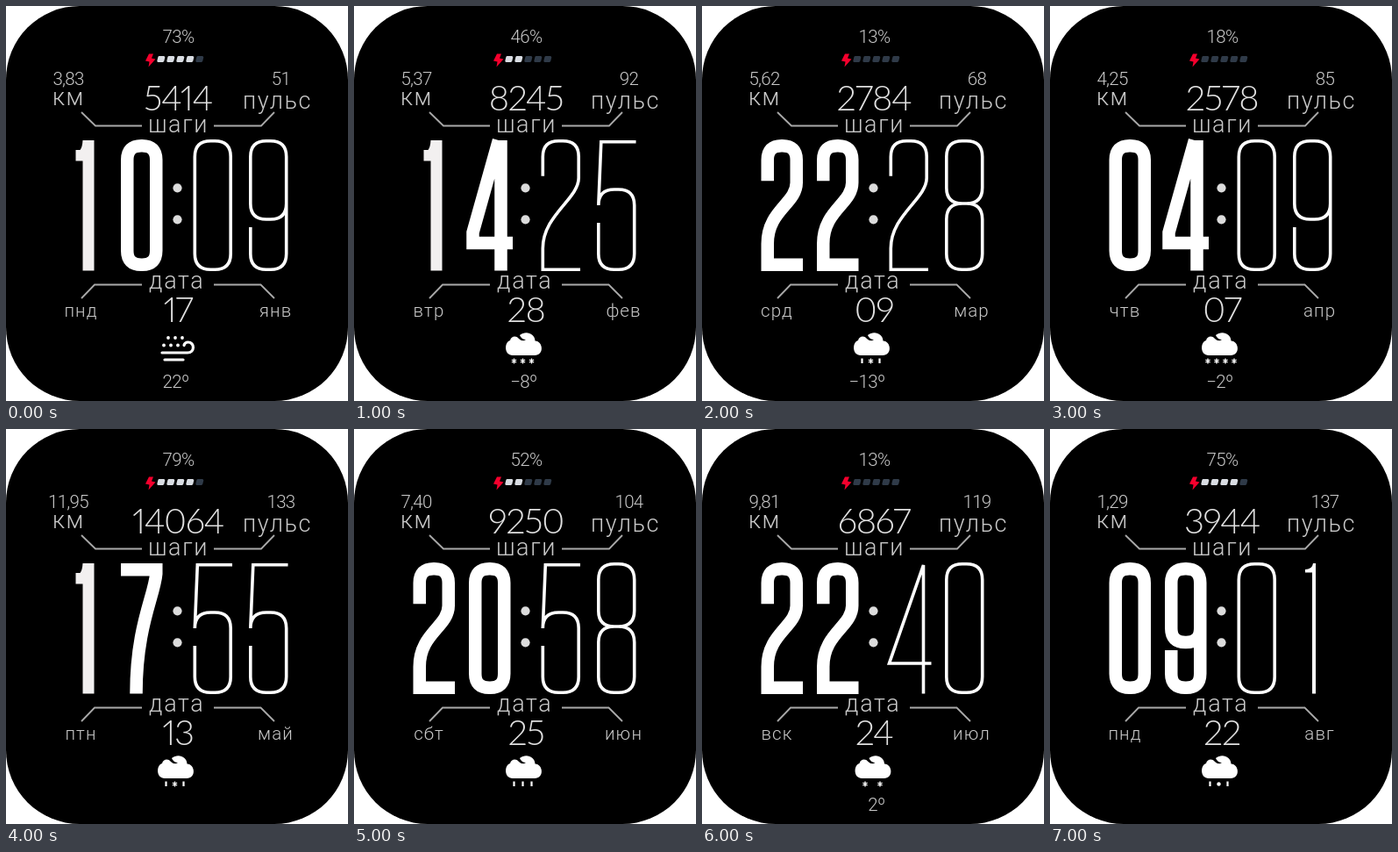
Recreate the animation shown at these times as an HTML page. Size 390 by 450 pixels, loop 8 s.

```html
<!DOCTYPE html>
<html lang="ru">
<head>
<meta charset="utf-8">
<title>Циферблат</title>
<style>
html, body { margin: 0; width: 100%; height: 100%; overflow: hidden; background: #fff; }
svg { display: block; width: 390px; height: 450px; }
text { fill: #c8c8c8; font-family: Roboto, sans-serif; font-weight: 300; text-anchor: middle; }
.label { font-size: 27px; letter-spacing: 1.6px; }
.small { font-size: 20.5px; letter-spacing: -0.7px; }
.word { font-size: 20.5px; letter-spacing: 1.1px; }
.number { font-family: Lato, sans-serif; font-size: 40px; letter-spacing: -1.4px; font-variant-numeric: proportional-nums; fill: #e0e0e0; }
.temp { text-anchor: end; }
.line { fill: none; stroke: #a9a9a9; stroke-width: 1.8; }
.glyph { fill: none; stroke: #fff; }
.state { display: none; }
.state.on { display: inline; }
</style>
</head>
<body>
<svg id="face" viewBox="0 0 390 450">
  <rect width="390" height="450" rx="84"/>
  <path class="line" d="M86 121L102 136.500H155M237 136.500H291L306 121M86 333L101 317.500H155M237 317.500H290.500L306 333"/>
  <path fill="#f5002d" d="M163 54.500H168L166 59.500L170.500 60.500L162.500 69.500L163.500 63.500L159 62.500Z"/>
  <g fill="#dcdcdc"><circle cx="195.500" cy="207.300" r="5.100"/><circle cx="195.500" cy="243.300" r="5.100"/></g>
  <text class="label" x="71.500" y="113">км</text>
  <text class="label" x="309.500" y="117">пульс</text>
  <text class="label" x="196.500" y="143.500">шаги</text>
  <text class="label" x="194.700" y="322">дата</text>
</svg>
<script>
const STEP = 1000;
const face = document.getElementById('face');

// battery, lit cells, km, pulse, steps, hours, minutes, weekday, date, month, weather, temperature
const states = [
  [73, 4, '3,83', 51, 5414, '10', '09', 'пнд', '17', 'янв', 'wind', '22º'],
  [46, 2, '5,37', 92, 8245, '14', '25', 'втр', '28', 'фев', '***', '−8º'],
  [13, 0, '5,62', 68, 2784, '22', '28', 'срд', '09', 'мар', '|*|', '−13º'],
  [18, 0, '4,25', 85, 2578, '04', '09', 'чтв', '07', 'апр', '****', '−2º'],
  [79, 4, '11,95', 133, 14064, '17', '55', 'птн', '13', 'май', '|*|', ''],
  [52, 2, '7,40', 104, 9250, '20', '58', 'сбт', '25', 'июн', '|||', ''],
  [13, 0, '9,81', 119, 6867, '22', '40', 'вск', '24', 'июл', '**', '2º'],
  [75, 4, '1,29', 137, 3944, '09', '01', 'пнд', '22', 'авг', '|o|', '']
];

const text = (cls, x, y, value) => `<text class="${cls}" x="${x}" y="${y}">${value}</text>`;

// Tall digit built around its stroke centre line
function digit(d, x, bold) {
  const w = bold ? 14.5 : 3.6, h = w / 2;
  const l = x + h, r = x + (bold ? 47.5 : 44.5) - h, t = 152 + h, b = 302 - h;
  const k = bold ? 16 : 18;
  // Squarish turn from one side to the other; side is 1 for a top edge, -1 for a bottom edge
  const cap = (from, to, edge, side) => {
    const s = Math.sign(to - from) * k, y = edge + side * k;
    return `V${y}Q${from} ${edge} ${from + s} ${edge}H${to - s}Q${to} ${edge} ${to} ${y}`;
  };
  const loop = (top, end) => `M${l} ${top + k}` + cap(l, r, top, 1) + cap(r, l, end, -1) + 'Z';
  if (d === '1') {
    return bold
      ? `<path fill="#f2f0f0" d="M${x + 12} 164H${x + 17}Q${x + 19.5} 161 ${x + 20} 153H${x + 33}V301.500H${x + 20}V176.500H${x + 12}Z"/>`
      : `<path fill="#fff" d="M${x + 14} 160Q${x + 22} 160 ${x + 23} 153H${x + 26}V301.500H${x + 22}V163.500H${x + 14}Z"/>`;
  }
  const paths = {
    0: loop(t, b),
    2: `M${l} ${t + 40}${cap(l, r, t, 1)}V${t + 42}C${r} ${t + 66} ${l} ${b - 62} ${l} ${b - 24}V${b}H${r + h}`,
    4: bold
      ? `M${x + 36.5} 301.500V153M${x + 34} 153L${x + 4.5} 258V270H${x + 50}`
      : `M${x + 39} 301.500V155L${x} 267H${x + 48}`,
    5: `M${r + h} ${t + 1}H${l + 3}L${l} ${209 + k}${cap(l, r, 209, 1)}${cap(r, l, b, -1)}V247`,
    7: `M${x} ${t + 1}H${r}V165C${r - 2} 190 ${x + 17.5} 225 ${x + 17.5} 301.500`,
    8: loop(t, 225) + loop(225, b),
    9: `M${l} 252${cap(l, r, b, -1)}${cap(r, l, t, 1)}${cap(l, r, 243, -1)}`
  };
  return `<path class="glyph" stroke-width="${w}" d="${paths[d]}"/>`;
}

const pair = (s, x, bold) => digit(s[0], x, bold) + digit(s[1], x + 63.5, bold);

function cells(lit) {
  let out = '';
  for (let i = 0; i < 5; i++) {
    const c = i < lit ? '#d9dde3' : '#2f3a48';
    out += `<path d="M${174.8 + i * 11} 58.500h5l-1 4h-5z" fill="${c}" stroke="${c}" stroke-width="3" stroke-linejoin="round"/>`;
  }
  return out;
}

function mark(kind, x) {
  if (kind === 'o') return `<circle cx="${x}" cy="404.500" r="2.200" fill="#fff"/>`;
  const d = kind === '|' ? `M${x} 401.500V407`
    : `M${x} 401.500v6M${x - 2.6} 403l5.200 3M${x - 2.6} 406l5.200 -3`;
  return `<path class="glyph" stroke-width="${kind === '|' ? 2.2 : 1.4}" d="${d}"/>`;
}

function weather(kind) {
  if (kind === 'wind') {
    const dots = [[185, 378], [193, 378], [201, 378], [180, 386.5], [188, 386.5], [196, 386.5]];
    return dots.map(([x, y]) => `<circle cx="${x}" cy="${y}" r="1.900" fill="#fff"/>`).join('') +
      '<path class="glyph" stroke-width="3.200" stroke-linecap="round" d="M178 395H207C215.500 395 215.500 383 207.500 383Q204 383 203 386.500M181 403H202"/>';
  }
  const n = kind.length, gap = n === 2 ? 17 : 10, dx = n === 2 ? 1.5 : 0;
  const mid = n === 4 ? 195 : n === 2 ? 194.5 : 192.5;
  return `<path transform="translate(${dx} 0)" fill="#fff" d="M181 398C171 398 171 383 178 381C179 376 185 375 188 379Q192 383 196 380Q191 380 189 375C196 369.500 206 373 206.500 381.500C216 382 217 398 206 398Z"/>` +
    [...kind].map((c, i) => mark(c, mid + (i - (n - 1) / 2) * gap)).join('');
}

function draw([power, lit, km, pulse, steps, hours, minutes, day, date, month, sky, temp]) {
  return '<g class="state">' +
    text('small', 196.5, 42, power + '%') + cells(lit) +
    text('small', 71, 90, km) + text('small', 313.5, 90, pulse) +
    text('number', 196, 119, steps) +
    pair(hours, 67.5, true) + pair(minutes, 213.5, false) +
    text('word', 85.5, 354, day) + text('number', 196, 360, date) + text('word', 307.5, 354, month) +
    weather(sky) + text('small temp', 208.5, 435, temp) + '</g>';
}

face.insertAdjacentHTML('beforeend', states.map(draw).join(''));
const groups = face.querySelectorAll('.state');
const start = performance.now();

function show() {
  const now = Math.floor((performance.now() - start) / STEP) % states.length;
  groups.forEach((g, i) => g.classList.toggle('on', i === now));
  requestAnimationFrame(show);
}
show();
</script>
</body>
</html>
```
